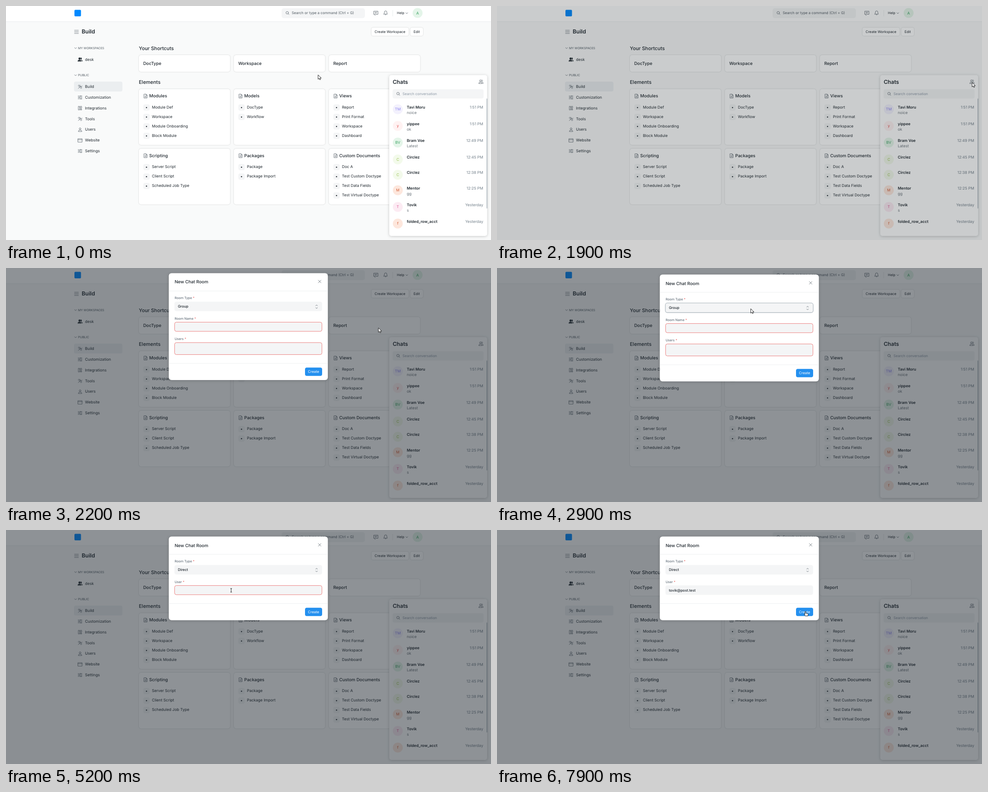
Recreate the animation shown at these times as an HTML page. Size 1077 px wide and 520 px high, loop 8000 ms.

```html
<!DOCTYPE html>
<html lang="en">
<head>
<meta charset="utf-8">
<title>New chat room</title>
<style>
  html, body { margin: 0; width: 100%; height: 100%; overflow: hidden; background: #f9fafa; }
  svg { display: block; width: 100vw; height: 100vh; font-family: Inter, sans-serif; }
  text { white-space: pre; text-rendering: geometricPrecision; }
  .card { fill: #fff; filter: drop-shadow(0 .4px .9px #0003); }
  .panel { fill: #fff; filter: drop-shadow(0 1px 3px #0003); }
  .line { fill: none; stroke: #505a62; stroke-width: .8; stroke-linecap: round; stroke-linejoin: round; }
  .cursor { fill: #fff; stroke: #111; stroke-width: .9; stroke-linejoin: round; }
</style>
</head>
<body>
<svg id="stage" viewBox="0 0 1077 520">
  <defs><clipPath id="listClip"><rect x="374" y="145" width="328" height="183" rx="3"/></clipPath></defs>
  <g id="page"></g>
  <g id="overlay"></g>
</svg>
<script>
const LOOP = 8000, STEP = 100;
const INK = '#1f272e', MUTED = '#687178', FIELD = '#f4f5f6', RED = '#e9605f', BLUE = '#2490ef';

const clamp = v => Math.max(0, Math.min(1, v));
const between = (t, a, b) => t >= a && t < b;

// y is the middle of the capital letters
const text = (x, y, s, size, weight = 400, fill = INK, anchor = 'start') =>
  `<text x="${x}" y="${y + size * .36}" font-size="${size}" font-weight="${weight}" fill="${fill}" text-anchor="${anchor}">${s}</text>`;
const rect = (x, y, w, h, r, attrs) => `<rect x="${x}" y="${y}" width="${w}" height="${h}" rx="${r}" ${attrs}/>`;
const fillRect = (x, y, w, h, r, color) => rect(x, y, w, h, r, `fill="${color}"`);
const card = (x, y, w, h, r = 5) => rect(x, y, w, h, r, 'class="card"');
const circle = (x, y, r, color) => `<circle cx="${x}" cy="${y}" r="${r}" fill="${color}"/>`;
const line = (x, y, d, attrs = '') => `<path class="line" transform="translate(${x} ${y})" d="${d}" ${attrs}/>`;

const icons = {
  search: 'M2.8 0a2.8 2.8 0 1 1-5.6 0a2.8 2.8 0 1 1 5.6 0M2 2L4 4',
  chat: 'M-4.5-4H4.5V3H0L-2.5 5V3H-4.5ZM-2.3-1.5H2.3M-2.3.5H1',
  bell: 'M-4 3H4Q2.8 2 2.8-1A2.8 3.2 0 0 0-2.8-1Q-2.8 2-4 3ZM-1 4.5H1',
  down: 'M-2.2-1L0 1.2L2.2-1',
  menu: 'M-4.5-3.5H4.5M-4.5 0H4.5M-4.5 3.5H4.5',
  tools: 'M-4 4L1-1M0-3.5A2.5 2.5 0 0 0 3.5 0L4-2M-4-2.5L-2.5-4L4 2.5L2.5 4Z',
  sliders: 'M-4.5-3H4.5M-4.5 0H4.5M-4.5 3H4.5M1.5-4V-2M-2-1V1M2 2V4',
  plug: 'M-3.5-4H-1V4H-3.5ZM1-4H3.5V0H1ZM1 2H3.5V4H1Z',
  user: 'M2-1.8a2 2 0 1 1-4 0a2 2 0 1 1 4 0M-4 4Q-4 1.2 0 1.2Q4 1.2 4 4Z',
  web: 'M-4.5-3.5H4.5V4H-4.5ZM-4.5-1.2H4.5',
  users: 'M.8-2a2 2 0 1 1-4 0a2 2 0 1 1 4 0M-5 3.8Q-5 1-1.2 1Q2.5 1 2.5 3.8ZM1.5-4A2 2 0 0 1 1.5 0M3 1Q5 1.5 5 3.8H3.8',
  file: 'M-3.3-4.3H1L3.3-2V4.3H-3.3ZM1-4.3V-2H3.3M-1.5 0H1.5M-1.5 2H1.5'
};
const icon = (name, x, y, attrs) => line(x, y, icons[name], attrs);

function navbar() {
  return fillRect(0, 0, 1077, 34.5, 0, '#fff') + fillRect(0, 34.5, 1077, .8, 0, '#e6e9eb') +
    fillRect(152, 8.5, 14.5, 14.5, 2, '#0089ff') +
    fillRect(612, 5, 185, 22, 5, FIELD) + icon('search', 624.5, 15) +
    text(634.5, 15.5, 'Search or type a command (Ctrl + G)', 7.93, 400, '#505a62') +
    icon('chat', 821.5, 15.5) + icon('bell', 843, 15) + fillRect(858.5, 9, .7, 14, 0, '#dfe3e6') +
    text(868, 15.5, 'Help', 7.6) + icon('down', 890, 15.8) +
    circle(914, 15.5, 11, '#e4f5e9') + text(914, 15.5, 'A', 8.5, 400, '#38a160', 'middle');
}

function sidebar() {
  const items = [['Build', 'tools'], ['Customization', 'sliders'], ['Integrations', 'plug'], ['Tools', 'tools'],
    ['Users', 'user'], ['Website', 'web'], ['Settings', 'sliders']];
  return icon('menu', 156.5, 57.5) + text(168, 56.5, 'Build', 12.3, 600) +
    icon('down', 154.5, 93.5) + text(160, 93.3, 'MY WORKSPACES', 6.65, 400, '#505a62') +
    icon('users', 164.5, 118.8, `style="fill:${INK};stroke:${INK}"`) + text(175.5, 118.5, 'desk', 8.54) +
    icon('down', 154.5, 153.8) + text(160, 153.5, 'PUBLIC', 6.8, 400, '#505a62') +
    fillRect(151, 168, 107.5, 22, 4, '#ebeef0') +
    items.map(([label, name], i) => {
      const y = 179 + i * 23.83;
      return icon(name, 164.5, y + .3) + text(175.5, y, label, 8.54);
    }).join('');
}

function widget(x, y, h, title, items) {
  return card(x, y, 202.7, h) + icon('file', x + 15, y + 15.7) + text(x + 23, y + 15.5, title, 9.65, 500) +
    items.map((item, i) => {
      const cy = y + 40 + i * 21;
      return fillRect(x + 10, cy - 6, 14, 14, 4, FIELD) + circle(x + 17, cy + 1.2, 1.3, INK) + text(x + 29, cy, item, 8.54);
    }).join('');
}

function workspace() {
  const columns = [295, 506, 717];
  const rows = [
    [184.5, 124.2, ['Modules', 'Module Def', 'Workspace', 'Module Onboarding', 'Block Module'],
      ['Models', 'DocType', 'Workflow'], ['Views', 'Report', 'Print Format', 'Workspace', 'Dashboard']],
    [317, 124, ['Scripting', 'Server Script', 'Client Script', 'Scheduled Job Type'],
      ['Packages', 'Package', 'Package Import'],
      ['Custom Documents', 'Doc A', 'Test Custom Doctype', 'Test Data Fields', 'Test Virtual Doctype']]
  ];
  return card(811.5, 48, 82.5, 18.3, 4) + text(852.7, 57.3, 'Create Workspace', 7.8, 400, INK, 'middle') +
    card(898, 48, 28, 18.3, 4) + text(912, 57.3, 'Edit', 7.8, 400, INK, 'middle') +
    text(295, 94, 'Your Shortcuts', 10.95, 500) + text(295, 169.5, 'Elements', 10.98, 500) +
    ['DocType', 'Workspace', 'Report'].map((name, i) =>
      card(columns[i], 109, 202.7, 37.3) + text(columns[i] + 9.7, 127.7, name, 9.6, 500)).join('') +
    rows.map(([y, h, ...widgets]) =>
      widgets.map(([title, ...items], i) => widget(columns[i], y, h, title, items)).join('')).join('');
}

function chats() {
  const rooms = [
    [224.5, 'Tavi Moru', 'TM', 'noice', '1:51 PM', '#f3f1fd', '#8a83f0'],
    [261.5, 'yippee', 'y', 'ok', '1:51 PM', '#fff2f2', '#e24c4c'],
    [298.5, 'Bram Voe', 'BV', 'Latest', '12:49 PM', '#e4f5e9', '#38a160'],
    [336, 'Circlez', 'C', '', '12:45 PM', '#f3faeb', '#9bc455'],
    [370, 'Circlez', 'C', '', '12:38 PM', '#f3faeb', '#9bc455'],
    [404.5, 'Mentor', 'M', 'gg', '12:25 PM', '#fde7dd', '#d2603a'],
    [441.5, 'Tovik', 'T', 's', 'Yesterday', '#fcebf3', '#dd5a97'],
    [478.5, 'folded_row_acct', 'f', '', 'Yesterday', '#fde7dd', '#d2603a']
  ];
  return rect(851, 153.5, 217.5, 357.5, 5, 'class="panel"') + text(858.7, 168.5, 'Chats', 12.1, 600) +
    icon('users', 1054.8, 168.2) + fillRect(858.5, 185, 202, 20.5, 4, FIELD) + icon('search', 870.5, 194.6) +
    text(880.5, 195.3, 'Search conversation', 7.9, 400, '#8d99a6') +
    '<rect id="thumb" x="1067" y="205.5" width="2" height="244.5" rx="1"/>' +
    rooms.map(([y, name, initials, message, time, back, front]) =>
      circle(870, y + 5, 11, back) + text(870, y + 5, initials, 8.3, 400, front, 'middle') +
      text(890, y, name, 8.54, 600) + text(890, y + 12.5, message, 8.54, 400, MUTED) +
      text(1059.7, y, time, 8.54, 400, '#74808b', 'end')).join('');
}

const field = (y, h, border) => rect(374.4, y, 327.2, h, 4, `fill="${FIELD}" stroke="${border}" stroke-width=".8"`);
const focusRing = (y, h) => rect(373.8, y - .6, 328.4, h + 1.2, 4.5, 'fill="none" stroke="#a6b1b9" stroke-width="1.1"');
const label = (y, s) =>
  text(374.4, y, `${s}<tspan fill="${RED}"> *</tspan>`, 7.25, 400, '#4c5a67');
const caret = x => fillRect(x, 129, .8, 9.5, 0, INK);

function modal(t) {
  const direct = t >= 3900, chosen = t >= 7000;
  const bottom = direct ? 200.5 : 252;
  const progress = clamp((t - 1980) / 300);
  const shift = -30.5 * (1 - progress) ** 1.75;
  let out = rect(361.5, 14.5, 353.2, bottom - 14.5, 6, 'class="panel"') +
    text(374.4, 34, 'New Chat Room', 9.76, 500) + line(696.5, 33, 'M-3-3L3 3M3-3L-3 3') +
    fillRect(361.5, 53.7, 353.2, .7, 0, '#e6e9eb') + label(69.5, 'Room Type') + field(78.3, 20.2, FIELD) +
    (between(t, 2300, 4400) ? focusRing(78.3, 20.2) : '') +
    text(381.7, 88.4, direct ? 'Direct' : 'Group', 7.93, 500) + line(689.7, 89, 'M-2-2L0-4L2-2M-2 2L0 4L2 2');
  if (direct) {
    out += label(115, 'User') + field(123.4, 20.4, chosen ? FIELD : RED);
    if (chosen) out += text(381.7, 133.7, 'tovik@post.test', 7.93, 500) + (t < 7900 ? focusRing(123.4, 20.4) : '');
    if (between(t, 4500, 5200) || between(t, 5600, 6300)) out += caret(382);
    if (between(t, 7000, 7500)) out += caret(446.3);
  } else {
    out += label(115, 'Room Name') + field(123.4, 20.4, RED) + label(160, 'Users') + field(168.8, 26.6, RED);
  }
  out += fillRect(361.5, bottom - 37.3, 353.2, .7, 0, '#e6e9eb') +
    fillRect(664, bottom - 27.7, 38, 18.4, 4, BLUE) + text(683, bottom - 18.5, 'Create', 7.9, 400, '#fff', 'middle');
  return `<g opacity="${clamp((t - 1980) / 150)}" transform="translate(0 ${shift})">${out}</g>`;
}

function typeOptions(t) {
  const active = t < 3600 ? 0 : 1;
  return rect(372.5, 99.5, 331, 25.5, 0, `fill="${FIELD}" stroke="#a6b1b9" stroke-width=".7"`) +
    fillRect(375, 100 + active * 12.5, 327, 12.3, 0, '#cfd3d6') +
    ['Group', 'Direct'].map((s, i) => text(381.7, 106.2 + i * 12.5, s, 7.93, 500)).join('');
}

function userList(cursorY) {
  const users = [
    ['folded_row_acct@example.com', 'folded_row_acct'],
    ['raw_row_demo@example.com', 'raw_row_demo'],
    ['tovik@post.test', 'Tovik Arlden'],
    ['mentor@post.test', 'Mentor'],
    ['demo_mass_addition_change@example.com', 'demo_mass_addition_change']
  ];
  const active = Math.max(0, Math.floor((cursorY - 146) / 39));
  return rect(374, 145, 328, 183, 3, 'class="panel"') + '<g clip-path="url(#listClip)">' +
    fillRect(378, 147.5 + active * 39, 317, 35.5, 4, FIELD) +
    users.map(([mail, name], i) =>
      text(384, 159.7 + i * 39, mail, 8, 600) + text(384, 172 + i * 39, name, 7.32)).join('') +
    fillRect(698, 145, 4, 183, 0, '#ebeef0') + fillRect(698, 145, 4, 63, 0, '#b5bdc4') + '</g>';
}

const path = [
  [200, 693, 153], [600, 860, 178], [900, 1066, 200], [1100, 1054, 171], [1200, 1055, 170], [1900, 1055, 170],
  [2000, 1053, 170], [2400, 601, 96], [2800, 601, 96], [2900, 563.5, 90.5], [3300, 563.5, 90.5], [3700, 545, 118],
  [4000, 544.5, 118.5], [4400, 500, 134], [6200, 500, 134], [6300, 500, 145], [6900, 470, 240], [7100, 470, 240],
  [7700, 685, 181]
];
function cursorAt(t) {
  const next = path.findIndex(key => key[0] > t);
  if (next === 0) return path[0].slice(1);
  if (next < 0) return path[path.length - 1].slice(1);
  const [t0, x0, y0] = path[next - 1], [t1, x1, y1] = path[next];
  const k = (t - t0) / (t1 - t0);
  return [x0 + (x1 - x0) * k, y0 + (y1 - y0) * k];
}

const cursors = {
  arrow: 'M0 0V9.8L2.3 7.8L3.9 11L5.5 10.3L4 7.2H7.2Z',
  hand: 'M-1 1A1 1 0 0 1 1 1V4L5 4.8Q6.3 5.1 6 6.6L5.3 10H-.3L-2.8 6.5Q-2.8 5.4-1.7 5.7L-1 6.5Z',
  beam: 'M-1.8-4H1.8M0-4V4M-1.8 4H1.8'
};
function cursor(t, x, y) {
  const kind = between(t, 1100, 1900) || between(t, 6400, 7000) || t >= 7600 ? 'hand'
    : between(t, 4300, 6400) ? 'beam' : 'arrow';
  return `<path class="cursor" transform="translate(${x} ${y})" d="${cursors[kind]}"/>`;
}

function overlay(t) {
  const [x, y] = cursorAt(t);
  let out = '';
  if (t > 1830) out += `<rect width="1077" height="520" fill="#1f272e" opacity="${clamp((t - 1830) / 150) * .5}"/>`;
  if (t > 1980) out += modal(t);
  if (between(t, 3100, 3900)) out += typeOptions(t);
  if (between(t, 5400, 7000)) out += userList(y);
  return out + cursor(t, x, y);
}

const byId = id => document.getElementById(id);
byId('page').innerHTML = navbar() + sidebar() + workspace() + chats();

let shown = -1;
function draw() {
  const t = Math.floor(performance.now() % LOOP / STEP) * STEP;
  if (t !== shown) {
    shown = t;
    byId('overlay').innerHTML = overlay(t);
    byId('thumb').setAttribute('fill', cursorAt(t)[0] > 1062 ? '#98a1a9' : '#bcc4ca');
  }
  requestAnimationFrame(draw);
}
draw();
</script>
</body>
</html>
```
